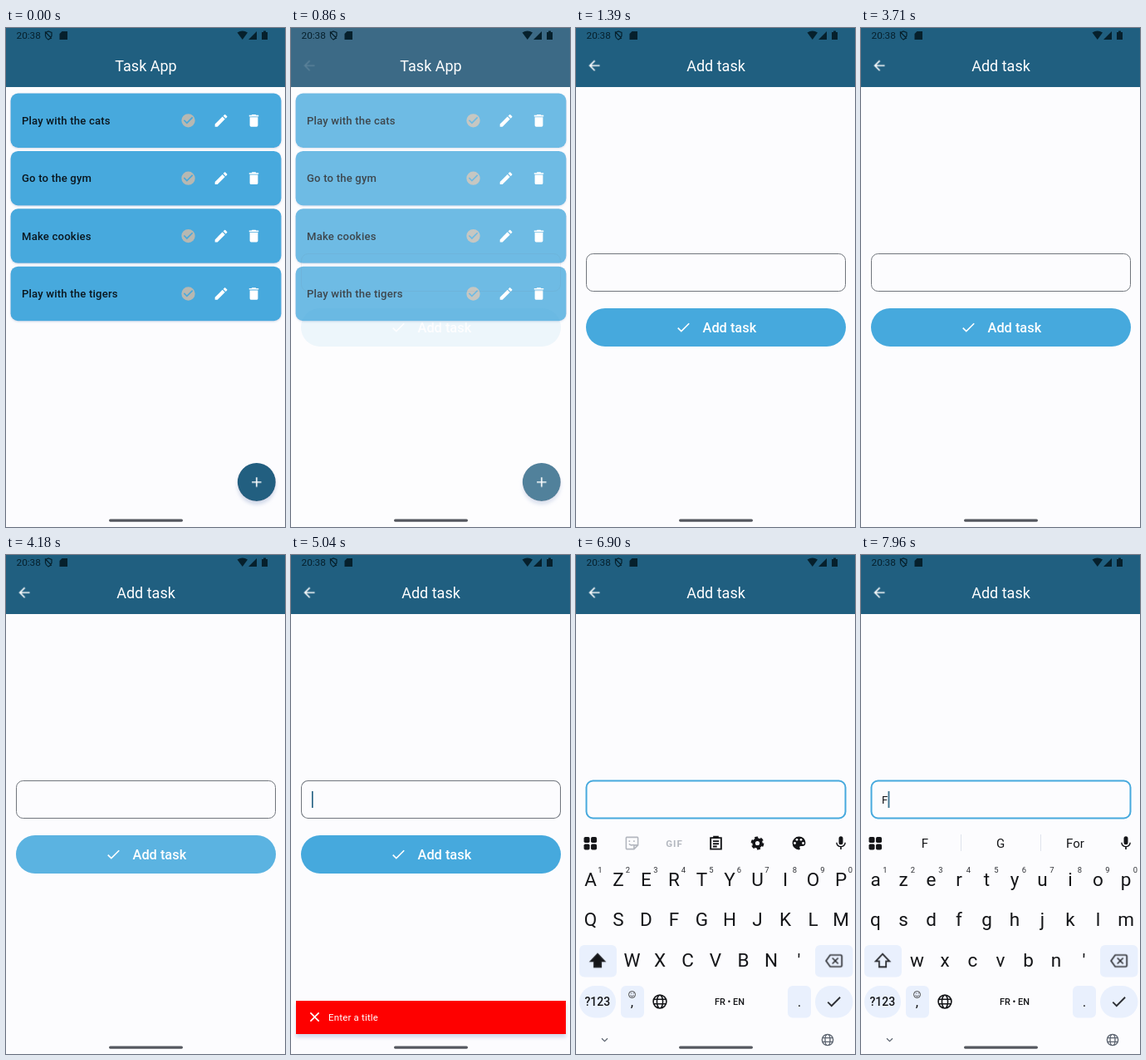
An HTML page for the animation above (8 s loop, 336x600 px).

```html
<!DOCTYPE html>
<html lang="en">
<head>
<meta charset="utf-8">
<title>Task App</title>
<style>
html, body { margin: 0; width: 100%; height: 100%; overflow: hidden; background: #fcfcfe; }
svg { display: block; width: 336px; height: 600px; font-family: Roboto, sans-serif; }
.ripple { transform-box: fill-box; transform-origin: center; }
</style>
</head>
<body>
<script>
const LOOP = 8000;
const DARK = '#205f80', BLUE = '#46a9dd', PAGE = '#fcfcfe', INK = '#141518', KEY = '#e9f0fd';
const OUTLINE = '#70757c', STATUS = '#06202c', MUTED = '#b3b7bf', NAV = '#5c6470';

const ICONS = {
  done: 'M12 2a10 10 0 1 0 0 20a10 10 0 1 0 0-20zm-2 15l-5-5 1.41-1.41L10 14.17l7.59-7.59L19 8z',
  edit: 'M3 17.25V21h3.75L17.81 9.94l-3.75-3.75zM20.71 7.04a1 1 0 0 0 0-1.41l-2.34-2.34a1 1 0 0 0-1.41 0l-1.83 1.83 3.75 3.75z',
  bin: 'M6 19a2 2 0 0 0 2 2h8a2 2 0 0 0 2-2V7H6zM19 4h-3.5l-1-1h-5l-1 1H5v2h14z',
  back: 'M20 11H7.83l5.59-5.59L12 4l-8 8 8 8 1.41-1.41L7.83 13H20z',
  check: 'M9 16.17L4.83 12l-1.42 1.41L9 19 21 7l-1.41-1.41z',
  close: 'M19 6.41L17.59 5 12 10.59 6.41 5 5 6.41 10.59 12 5 17.59 6.41 19 12 13.41 17.59 19 19 17.59 13.41 12z',
  add: 'M19 13h-6v6h-2v-6H5v-2h6V5h2v6h6z',
  mic: 'M12 14a3 3 0 0 0 3-3V5a3 3 0 0 0-6 0v6a3 3 0 0 0 3 3zm5.3-3a5.3 5.1 0 0 1-10.6 0H5a7 7 0 0 0 6 6.72V21h2v-3.28A7 7 0 0 0 19 11z',
  palette: 'M12 2a10 10 0 0 0 0 20 1.7 1.7 0 0 0 1.3-2.8 1.7 1.7 0 0 1 1.3-2.8H17a5 5 0 0 0 5-5C22 6 17.5 2 12 2z',
  erase: 'M7 4h14.5a1.5 1.5 0 0 1 1.5 1.5v13a1.5 1.5 0 0 1-1.5 1.5H7L1.3 12zM10 8l8 8M18 8l-8 8',
  shift: 'M12 3L3 12.5h4.5V20h9v-7.5H21z',
  globe: 'M2 12a10 10 0 1 0 20 0a10 10 0 1 0-20 0M7.5 12a4.5 10 0 1 0 9 0a4.5 10 0 1 0-9 0M3 8.5h18M3 15.5h18',
  board: 'M4 4h16v17H4zM9 4V2h6v2M7.5 9h9M7.5 13h9M7.5 17h6',
  sticker: 'M4 3h16a1 1 0 0 1 1 1v11l-6 6H4a1 1 0 0 1-1-1V4a1 1 0 0 1 1-1zM21 15h-6v6M7.5 13a5 4 0 0 0 7 1M8 8v2M15 8v2',
  chevron: 'M6 9l6 6 6-6',
};

const svg = document.body.appendChild(document.createElementNS('http://www.w3.org/2000/svg', 'svg'));
svg.setAttribute('viewBox', '0 0 336 600');

function add(parent, tag, attrs = {}, text) {
  const el = document.createElementNS(svg.namespaceURI, tag);
  for (const name in attrs) el.setAttribute(name, attrs[name]);
  if (text) el.textContent = text;
  return parent.appendChild(el);
}
const group = (parent, attrs) => add(parent, 'g', attrs);
const rect = (parent, x, y, width, height, rx, fill, more) =>
  add(parent, 'rect', { x, y, width, height, rx, fill, ...more });
const circle = (parent, cx, cy, r, fill, more) => add(parent, 'circle', { cx, cy, r, fill, ...more });
const label = (parent, text, x, y, size, fill, more) =>
  add(parent, 'text', { x, y, 'font-size': size, fill, ...more }, text);
const MID = { 'text-anchor': 'middle' };
const MID_BOLD = { ...MID, 'font-weight': 500 };

function icon(parent, name, cx, cy, size, color, line) {
  const k = size / 24;
  const paint = line ? { fill: 'none', stroke: color, 'stroke-width': line } : { fill: color };
  return add(parent, 'path', { d: ICONS[name], transform: `translate(${cx - size / 2} ${cy - size / 2}) scale(${k})`, ...paint });
}

// steps: [ms, value] pairs; hard = jump instead of blend
function play(el, prop, steps, { hard = false, easing = 'linear' } = {}) {
  const track = [...steps];
  if (track[0][0] > 0) track.unshift([0, track[0][1]]);
  track.push([LOOP, track[track.length - 1][1]]);
  el.animate(track.map(([ms, value]) => ({ offset: ms / LOOP, [prop]: value, easing: hard ? 'step-end' : easing })),
    { duration: LOOP, iterations: Infinity });
}
const show = (el, ...steps) => play(el, 'opacity', steps, { hard: true });

function ripple(parent, cx, cy, r, start, grown, release, end) {
  const dot = circle(parent, cx, cy, r, '#fff', { class: 'ripple', opacity: 0 });
  play(dot, 'transform', [[start, 'scale(.1)'], [grown, 'scale(1)']], { easing: 'ease-out' });
  play(dot, 'opacity', [[start, 0], [start + 70, .12], [release, .12], [end, 0]]);
}

function shadow(id, dy, blur, color) {
  const f = add(defs, 'filter', { id, x: '-20%', y: '-20%', width: '140%', height: '150%' });
  add(f, 'feDropShadow', { dx: 0, dy, stdDeviation: blur, 'flood-color': color });
}
const defs = add(svg, 'defs');
shadow('low', 1, 1, '#d3dbe8');
shadow('high', 4, 2, '#d3daea');
rect(add(defs, 'clipPath', { id: 'button' }), 12, 337, 313, 46, 23);

// Task list
const list = group(svg);
rect(list, 0, 0, 336, 600, 0, PAGE);
['Play with the cats', 'Go to the gym', 'Make cookies', 'Play with the tigers'].forEach((task, i) => {
  const card = group(list, { transform: `translate(0 ${i * 69.4})` });
  rect(card, 5.5, 78.5, 326, 65.5, 9, BLUE, { filter: 'url(#low)' });
  label(card, task, 19, 116, 13.08, '#0a161e', { 'font-weight': 500, 'letter-spacing': .2 });
  icon(card, 'done', 219.5, 111.3, 19.6, '#b7b8b2');
  icon(card, 'edit', 259, 111.3, 19.6, '#fff');
  icon(card, 'bin', 298.5, 111.3, 19.6, '#fff');
});
circle(list, 301.8, 546, 23, DARK, { filter: 'url(#high)' });
ripple(list, 301.8, 546, 23, 70, 400, 450, 790);
icon(list, 'add', 301.8, 546, 19.6, '#fff');

// Add task page: its background fades in ahead of its content
const veil = rect(svg, 0, 71, 336, 529, 0, PAGE);
play(veil, 'opacity', [[790, 0], [860, .21], [1080, 1]]);
const form = group(svg);
play(form, 'opacity', [[840, 0], [1080, 1]]);
const field = rect(form, 12.5, 271.5, 312, 45, 8, 'none', { stroke: OUTLINE });
play(field, 'stroke', [[5040, OUTLINE], [5200, BLUE]]);
play(field, 'strokeWidth', [[5040, '1px'], [5200, '2px']]);
show(label(form, 'F', 25, 298.5, 13.08, INK), [0, 0], [7760, 1]);
const cursor = rect(form, 25, 284, 1.6, 20, 0, DARK);
show(cursor, [0, 0], [4910, 1], [5540, 0], [6060, 1], [6560, 0], [7060, 1], [7560, 0], [7760, 1]);
play(cursor, 'transform', [[0, 'translateX(0px)'], [7760, 'translateX(7.6px)']], { hard: true });

rect(form, 12, 337, 313, 46, 23, BLUE);
ripple(group(form, { 'clip-path': 'url(#button)' }), 168, 360, 160, 3710, 4200, 4250, 4770);
icon(form, 'check', 129.3, 360, 20, '#fff');
label(form, 'Add task', 152.5, 365.7, 16.35, '#fff', { 'font-weight': 500 });

const notice = group(form);
play(notice, 'opacity', [[4200, 0], [4450, 1]]);
rect(notice, 6, 536, 325, 40, 0, '#fe0000', { filter: 'url(#high)' });
icon(notice, 'close', 28.5, 555.5, 19.6, '#fff');
label(notice, 'Enter a title', 45, 559.7, 11.44, '#fff', { 'letter-spacing': .2 });

// App bar and status bar
const bar = rect(svg, 0, 0, 336, 71, 0, DARK);
play(bar, 'fill', [[790, DARK], [860, '#3c6a86'], [1080, DARK]]);
const listTitle = label(svg, 'Task App', 168.5, 51.5, 18, '#fff', MID);
play(listTitle, 'opacity', [[870, 1], [980, 0]]);
const formTitle = label(svg, 'Add task', 168.5, 51.5, 18, '#fff', MID);
play(formTitle, 'opacity', [[870, 0], [1080, 1]]);
play(icon(svg, 'back', 22, 45.2, 19.6, '#fff'), 'opacity', [[820, 0], [1080, 1]]);

const status = group(svg, { fill: STATUS });
label(status, '20:38', 12.5, 13, 11.8, STATUS);
add(status, 'path', { d: 'M47.5 5.5L51 4l4 1.5v4q-1 3-4 4.5q-3-1.5-3.5-4.5zM47 4.5l8 8', fill: 'none', stroke: STATUS, 'stroke-width': 1.2 });
add(status, 'path', { d: 'M67.5 4H74v10H64.5V7z' });
add(status, 'path', { d: 'M278.5 5.5q6.2-4 12.5 0L284.8 14z' });
add(status, 'path', { d: 'M302 4v10h-10z' });
add(status, 'path', { d: 'M308 5h2V3.5h3V5h2v9h-7z' });

// Keyboard
const keyboard = group(svg);
play(keyboard, 'transform', [[5110, 'translateY(280px)'], [5400, 'translateY(0px)']], { easing: 'cubic-bezier(.2,0,.2,1)' });
show(keyboard, [0, 0], [5110, 1]);
rect(keyboard, 0, 323, 336, 277, 0, PAGE);

for (const x of [9.5, 18]) for (const y of [339, 347.5]) rect(keyboard, x, y, 7, 7, 1.8, INK);
icon(keyboard, 'mic', 319, 346.5, 20, INK);

const tools = group(keyboard);
show(tools, [0, 1], [7760, 0]);
icon(tools, 'sticker', 67.5, 346.5, 19, MUTED, 2);
label(tools, 'GIF', 118.5, 350.6, 11.5, MUTED, { ...MID, 'font-weight': 700, 'letter-spacing': 1 });
icon(tools, 'board', 168.5, 346.5, 19, INK, 2.4);
circle(tools, 218.5, 346.5, 4.4, 'none', { stroke: INK, 'stroke-width': 3.6 });
circle(tools, 218.5, 346.5, 6.6, 'none', { stroke: INK, 'stroke-width': 2.6, 'stroke-dasharray': '3.9 3.011' });
icon(tools, 'palette', 268.5, 346.5, 19, INK);
for (const [x, y] of [[263.5, 346.5], [266, 342.3], [271, 342.3], [273.5, 346.5]]) circle(tools, x, y, 1.4, PAGE);

const hints = group(keyboard);
show(hints, [0, 0], [7760, 1]);
['F', 'G', 'For'].forEach((word, i) => label(hints, word, [77, 168, 258][i], 352, 15, INK, MID));
for (const x of [120, 216]) rect(hints, x, 336, 1, 20, 0, '#dfe3ec');

const ROWS = [['azertyuiop', 17.5, 397.5], ['qsdfghjklm', 17.5, 446], ["wxcvbn'", 67.5, 495]];
function letters(convert) {
  const g = group(keyboard);
  for (const [row, x, y] of ROWS)
    [...row].forEach((c, i) => label(g, convert(c), x + i * 33.5, y, 22.5, INK, MID));
  return g;
}
rect(keyboard, 4, 469, 45, 38.5, 6, KEY);
rect(keyboard, 288, 469, 45.5, 38.5, 6, KEY);
show(letters(c => c), [0, 1], [6900, 0], [7760, 1]);
show(letters(c => c.toUpperCase()), [0, 0], [6900, 1], [7760, 0]);
[...'1234567890'].forEach((n, i) => label(keyboard, n, 29 + i * 33.5, 382, 9.4, '#2c2e33', MID));
icon(keyboard, 'shift', 26, 488, 22, '#2c2e33', 2);
show(icon(keyboard, 'shift', 26, 488, 22, INK), [0, 0], [6900, 1], [7760, 0]);
icon(keyboard, 'erase', 310.5, 488, 21, '#2c2e33', 1.9);

rect(keyboard, 4, 518, 44, 38.5, 19, KEY);
label(keyboard, '?123', 25.8, 542, 14, INK, MID_BOLD);
rect(keyboard, 54, 518, 28, 38.5, 6, KEY);
circle(keyboard, 67.5, 528.5, 4, 'none', { stroke: '#444' });
add(keyboard, 'path', { d: 'M65.5 529.5q2 2.5 4 0M66 527h1M68.5 527h1', fill: 'none', stroke: '#444' });
label(keyboard, ',', 67.5, 543, 17, INK, MID);
icon(keyboard, 'globe', 101, 537, 19, INK, 2);
label(keyboard, 'FR • EN', 185, 540.7, 10.9, INK, MID_BOLD);
rect(keyboard, 255, 518, 28, 38.5, 6, KEY);
label(keyboard, '.', 269, 543, 17, INK, MID);
rect(keyboard, 288, 518, 45.5, 38.5, 19, KEY);
icon(keyboard, 'check', 310.5, 537, 22, '#2c2e33');
icon(keyboard, 'chevron', 34.5, 583, 14, NAV, 2);
icon(keyboard, 'globe', 303, 583, 16, NAV, 2);

rect(svg, 124, 590.5, 89, 3.2, 1.6, '#55585f');
</script>
</body>
</html>
```
